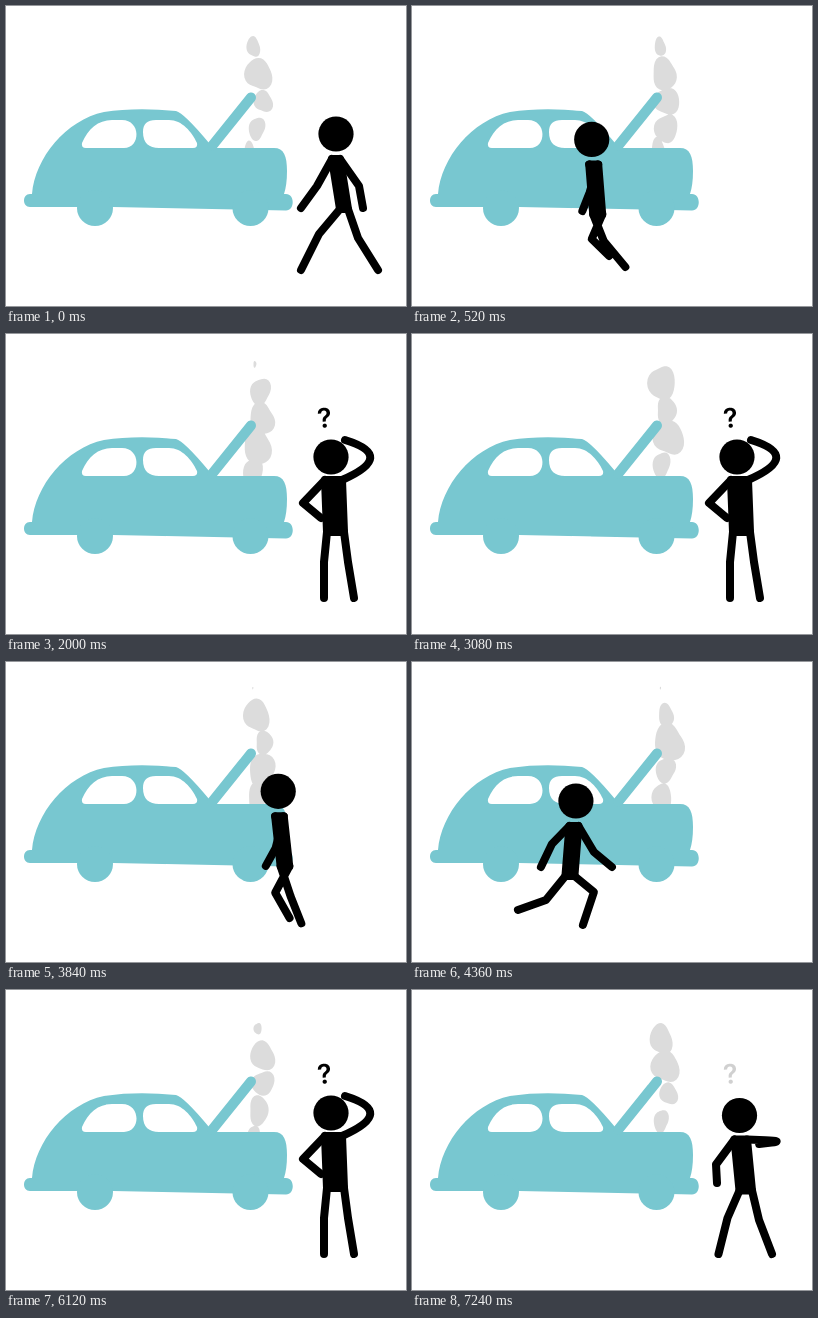
Recreate the animation shown at these times as an HTML page. Size 400 by 300 pixels, loop 7.28 s.

```html
<!DOCTYPE html>
<html lang="en">
<head>
<meta charset="utf-8">
<title>Car trouble</title>
<style>
  html, body { margin: 0; width: 100%; height: 100%; overflow: hidden; background: #fff; }
  svg { display: block; width: 100vw; height: 100vh; }
  text { font: 600 27px Inter, "Liberation Sans", Arial, sans-serif; text-anchor: middle; }
</style>
</head>
<body>
<svg viewBox="0 0 400 300">
  <path id="smoke" fill="#dcdcdc"/>

  <g fill="#78c7d0">
    <path fill-rule="evenodd" d="M26 188C29 152 60 114 98 106Q130 101 170 105Q178 107 203 137L210 142H268C278 142 281 150 281 165Q281 179 278 188H280C289 188 289 204.500 280 204.500L107 201H24C16 201 16 188 24 188Z
      M76 137C82 123 92 114 106 114H116C135 114 135 142 118 142H80Q75 142 76 137Z
      M137 126C137 118 141 114 150 114H163C176 114 186 126 191 137Q192 142 187 142H153C143 142 137 137 137 126Z"/>
    <circle cx="89" cy="202" r="18"/>
    <circle cx="244.500" cy="202" r="18"/>
    <path d="M206 140L245 91.500" stroke="#78c7d0" stroke-width="10" stroke-linecap="round"/>
  </g>

  <g id="man" stroke="#000" stroke-width="8" stroke-linecap="round" stroke-linejoin="round">
    <circle id="head" r="17.600" stroke="none"/>
    <path id="torso"/>
    <path id="limbs" fill="none"/>
  </g>
  <text id="ask" x="318.500" y="93.500" transform="rotate(-6 319 84)">?</text>
</svg>
<script>
const $ = id => document.getElementById(id);
const LOOP = 7280, ACT = LOOP / 2, STEP = 40;

// Key poses: body is head, neck, hip; limbs are left then right, each joint then tip.
const run = {
  body: [[0, 139], [-2, 164], [-6, 214]], half: 4.5, bend: 0,
  arms: [[[-24, 182], [-35, 205]], [[18, 190], [36, 205]]],
  legs: [[[-30, 238], [-58, 248]], [[18, 230], [7, 263]]]
};
const walk = {
  body: [[0, 128], [0, 153], [8, 203]], half: 4, bend: 0,
  arms: [[[-19, 180], [-35, 202]], [[23, 180], [27, 202]]],
  legs: [[[-17, 228], [-35, 264]], [[22, 232], [42, 264]]]
};
const think = {
  body: [[-5, 123], [-2.5, 146], [-.5, 198]], half: 8.5, bend: 1,
  arms: [[[-33, 169], [-15, 184]], [[61, 122], [9, 106]]],
  legs: [[[-12, 228], [-12, 264]], [[12, 228], [18, 264]]]
};

const clamp = v => Math.max(0, Math.min(1, v));
const wave = v => Math.sin(v * Math.PI);

function mix(a, b, k) {
  if (typeof a === 'number') return a + (b - a) * k;
  if (Array.isArray(a)) return a.map((v, i) => mix(v, b[i], k));
  return Object.fromEntries(Object.keys(a).map(key => [key, mix(a[key], b[key], k)]));
}
const swap = p => ({ ...p, arms: [...p.arms].reverse(), legs: [...p.legs].reverse() });
function flip(p) {
  const mirror = v => typeof v[0] === 'number' ? [-v[0], v[1]] : v.map(mirror);
  return swap({ ...p, body: mirror(p.body), arms: mirror(p.arms), legs: mirror(p.legs) });
}

// Half a gait cycle: the rear limbs swing forward with a lifted foot while the body bobs.
function stride(k, start = run) {
  const pose = mix(start, swap(run), k), lift = wave(k);
  pose.body.forEach(point => point[1] -= 6 * lift);
  pose.legs[0][1][1] -= 8 * lift;
  pose.legs[1][1][1] += 8 * lift;
  return pose;
}
const phase = t => (t / 320 % 1 + 1) % 1;
const runRight = t => stride(phase(t - 720));
const runLeft = t => flip(stride(phase(t), t < 320 ? flip(walk) : run));

function manAt(t) {
  if (t < 640) return [330 - .289 * t, runLeft(t)];
  if (t < 1384) return [242 + .244 * (t - 1040), runRight(t)];
  if (t < 1520) {
    const k = (t - 1384) / 136;
    return [326 + 4 * k, mix(runRight(1384), think, k)];
  }
  const pose = mix(think, walk, clamp((t - 3560) / 80));
  pose.arms[1][1][0] += wave((t - 2000) / 120);
  return [330, pose];
}

function drawMan(x, { body: [head, neck, hip], half, bend, arms, legs }) {
  const side = ([px, py], s) => [px + s * half, py];
  const limb = (root, [joint, tip], curve = 0) =>
    `M${root}L${mix(joint, root, curve)}Q${joint} ${mix(joint, tip, curve)}L${tip}`;
  const [sl, sr, hl, hr] = [side(neck, -1), side(neck, 1), side(hip, -1), side(hip, 1)];
  $('man').setAttribute('transform', `translate(${x})`);
  $('head').setAttribute('cx', head[0]);
  $('head').setAttribute('cy', head[1]);
  $('torso').setAttribute('d', `M${sl}L${sr}L${hr}L${hl}Z`);
  $('limbs').setAttribute('d',
    limb(sl, arms[0]) + limb(sr, arms[1], bend) + limb(hl, legs[0]) + limb(hr, legs[1]));
}

// Wobbly puffs rise from behind the bonnet, swell, drift and shrink away.
const PUFFS = 56, GAP = LOOP / PUFFS, LIFE = 600;
function random(n) {
  const v = Math.sin(n * 12.9898 + 4) * 43758.5453;
  return v - Math.floor(v);
}
function puff(n, age) {
  const seed = (n + PUFFS) % PUFFS, size = (.65 + .5 * random(seed)) * Math.min(1, 5 * (1 - age));
  const x = 246 + 10 * wave(age) + 6 * (random(seed + .3) - .5), y = 150 - 126 * age;
  const rx = size * (7.5 + 6 * wave(age)), ry = size * 16, turn = 6 * random(seed + .6);
  const points = Array.from({ length: 32 }, (_, i) => {
    const a = i / 16 * Math.PI, r = 1 + .1 * Math.sin(2 * a + turn) + .08 * Math.sin(3 * a - turn);
    return [x + rx * r * Math.cos(a), y + ry * r * Math.sin(a)];
  });
  return `M${points.join('L')}Z`;
}
function drawSmoke(t) {
  let d = '';
  for (let n = Math.ceil((t - LIFE) / GAP); n * GAP <= t; n++) d += puff(n, (t - n * GAP) / LIFE);
  $('smoke').setAttribute('d', d);
}

function draw(now) {
  const t = Math.floor(now % LOOP / STEP) * STEP, act = t % ACT;
  drawSmoke(t);
  drawMan(...manAt(act));
  $('ask').setAttribute('opacity', Math.min(clamp((act - 1500) / 160), clamp((3618 - act) / 100)));
}

const begin = performance.now();
function tick() {
  draw(performance.now() - begin);
  requestAnimationFrame(tick);
}
tick();
</script>
</body>
</html>
```
